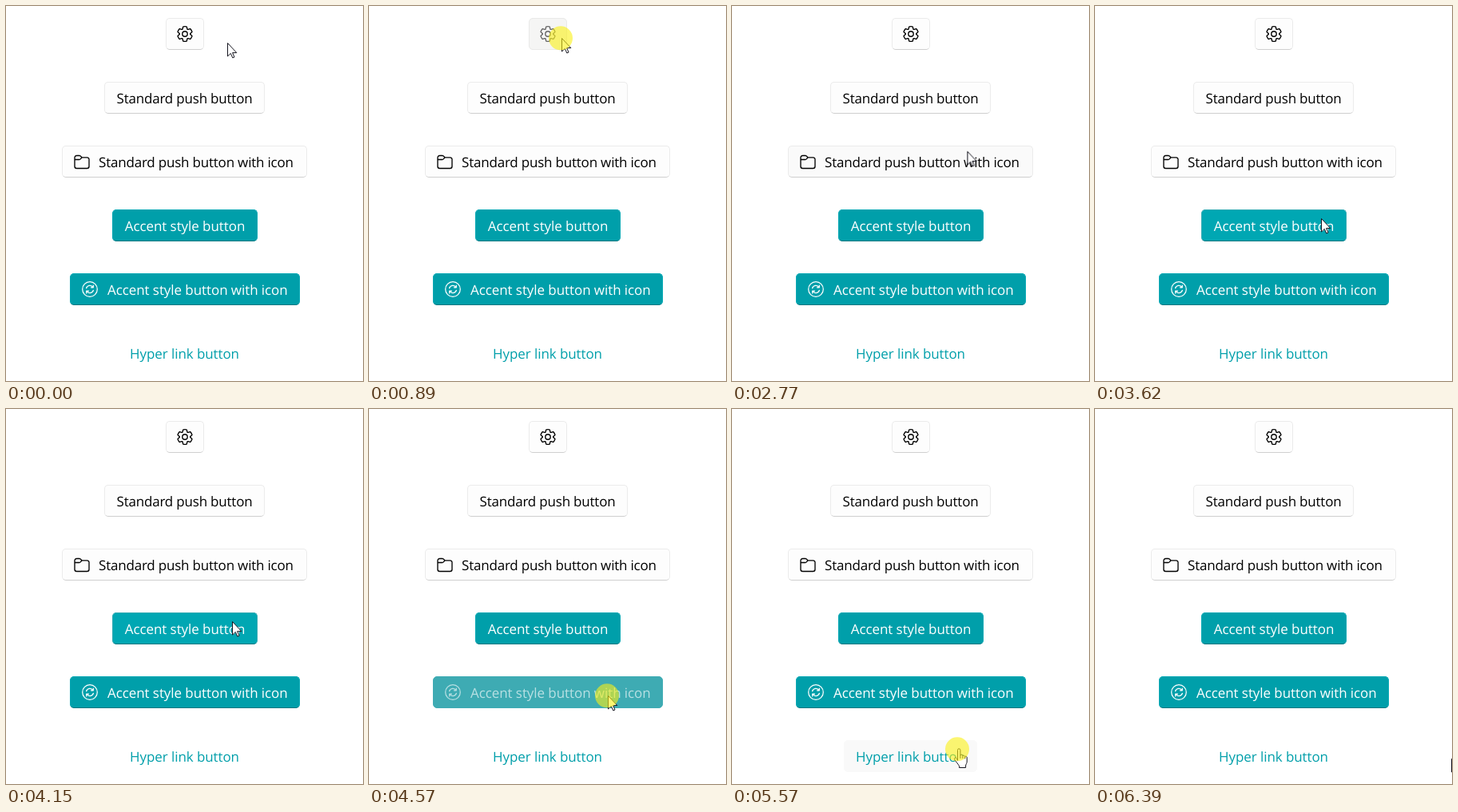
These frames come from a looping animation (447 px wide and 470 px high, 6460 ms). An HTML page:

```html
<!DOCTYPE html>
<html lang="en">
<head>
<meta charset="utf-8">
<title>Button styles</title>
<style>
  html, body { margin: 0; width: 100%; height: 100%; overflow: hidden; background: #fff; }
  #stage { position: relative; width: 447px; height: 470px; overflow: hidden; }

  .btn {
    position: absolute; box-sizing: border-box; height: 40px;
    border: 1px solid; border-radius: 5px;
    font: 17px/39px "Open Sans", "Noto Sans", sans-serif;
    text-align: center; white-space: nowrap;
    text-rendering: geometricPrecision;
    animation: 6460ms step-end infinite;
  }
  .std {
    --bg: #fdfdfd; --fg: #000; --edge: #ebebeb; --base: #cfcfcf;
    --bg-h: #fafafa; --edge-h: #ebebeb; --base-h: #cfcfcf;
    --bg-p: #f5f5f4; --fg-p: #666; --edge-p: #e9e9e8;
    letter-spacing: -.2px;
  }
  .accent {
    --bg: #009faa; --fg: #fff; --edge: #00a7b3; --base: #007780;
    --bg-h: #00a7b3; --edge-h: #2daab3; --base-h: #007780;
    --bg-p: #3eabb3; --fg-p: rgba(255,255,255,.63); --edge-p: #3eabb3;
    letter-spacing: -.07px;
  }
  .link {
    --bg: #fff; --fg: #009faa; --edge: #fff; --base: #fff;
    --bg-h: #f6f6f6; --edge-h: #f6f6f6; --base-h: #f6f6f6;
    --bg-p: #f9f9f9; --fg-p: #009faa; --edge-p: #f9f9f9;
    letter-spacing: -.09px;
  }
  .btn { background-color: var(--bg); color: var(--fg); border-color: var(--edge) var(--edge) var(--base); }
  .icon { text-align: left; }
  .btn svg { position: absolute; fill: none; stroke: currentColor; stroke-linejoin: round; stroke-linecap: round; overflow: visible; }

  #gear   { left: 200px; top: 15px;  width: 48px;  animation-name: gear; }
  #push   { left: 123px; top: 95px;  width: 201px; animation-name: push; }
  #folder { left: 70px;  top: 175px; width: 307px; padding-left: 45px; animation-name: folder; }
  #solid  { left: 133px; top: 255px; width: 182px; animation-name: solid; }
  #sync   { left: 80px;  top: 335px; width: 288px; padding-left: 46px; animation-name: sync; }
  #hyper  { left: 140px; top: 415px; width: 167px; animation-name: hyper; }

  /* hover, press, release, leave */
  @keyframes gear {
    10.1%, 18.73% { background-color: var(--bg-h); color: var(--fg); border-color: var(--edge-h) var(--edge-h) var(--base-h); }
    13.77% { background-color: var(--bg-p); color: var(--fg-p); border-color: var(--edge-p); }
    21.4%, 100% { background-color: var(--bg); color: var(--fg); border-color: var(--edge) var(--edge) var(--base); }
  }
  @keyframes push {
    24.6%, 36.53% { background-color: var(--bg-h); color: var(--fg); border-color: var(--edge-h) var(--edge-h) var(--base-h); }
    29.4% { background-color: var(--bg-p); color: var(--fg-p); border-color: var(--edge-p); }
    39.8%, 100% { background-color: var(--bg); color: var(--fg); border-color: var(--edge) var(--edge) var(--base); }
  }
  @keyframes folder {
    42.3%, 51.08% { background-color: var(--bg-h); color: var(--fg); border-color: var(--edge-h) var(--edge-h) var(--base-h); }
    44.88% { background-color: var(--bg-p); color: var(--fg-p); border-color: var(--edge-p); }
    52.9%, 100% { background-color: var(--bg); color: var(--fg); border-color: var(--edge) var(--edge) var(--base); }
  }
  @keyframes solid {
    54.4%, 64.24% { background-color: var(--bg-h); color: var(--fg); border-color: var(--edge-h) var(--edge-h) var(--base-h); }
    60.05% { background-color: var(--bg-p); color: var(--fg-p); border-color: var(--edge-p); }
    65.9%, 100% { background-color: var(--bg); color: var(--fg); border-color: var(--edge) var(--edge) var(--base); }
  }
  @keyframes sync {
    66.9%, 77.86% { background-color: var(--bg-h); color: var(--fg); border-color: var(--edge-h) var(--edge-h) var(--base-h); }
    70.73% { background-color: var(--bg-p); color: var(--fg-p); border-color: var(--edge-p); }
    80.4%, 100% { background-color: var(--bg); color: var(--fg); border-color: var(--edge) var(--edge) var(--base); }
  }
  @keyframes hyper {
    83%, 88.24% { background-color: var(--bg-h); color: var(--fg); border-color: var(--edge-h) var(--edge-h) var(--base-h); }
    86.21% { background-color: var(--bg-p); color: var(--fg-p); border-color: var(--edge-p); }
    90.8%, 100% { background-color: var(--bg); color: var(--fg); border-color: var(--edge) var(--edge) var(--base); }
  }

  #pointer { position: absolute; left: 0; top: 0; width: 1px; height: 1px; overflow: visible; animation: move 6460ms ease-in-out infinite; }
  #pointer path { fill: #fff; stroke: #15151f; stroke-linejoin: round; }
  #arrow { animation: arrow 6460ms step-end infinite; }
  #hand { opacity: 0; animation: hand 6460ms step-end infinite; }
  #click { fill: rgba(250,240,20,.6); opacity: 0; animation: click 6460ms step-end infinite; }

  @keyframes move {
    0%, 3.87% { transform: translate(277px, 46px); }
    12.69%, 18.6% { transform: translate(241px, 40px); }
    27.4%, 36.5% { transform: translate(280px, 108px); }
    44.7%, 51.1% { transform: translate(296px, 190px); }
    55.7%, 64.2% { transform: translate(283px, 266px); }
    68.5%, 78% { transform: translate(299px, 359px); }
    85.1% { transform: translate(283px, 426px); }
    88.2% { transform: translate(283px, 426px); animation-timing-function: ease-in; }
    93.6% { transform: translate(370px, 440px); }
    94.7% { transform: translate(370px, 440px); animation-timing-function: linear; }
    98.9%, 100% { transform: translate(446px, 438px); }
  }
  @keyframes arrow {
    0%, 90.8%, 100% { opacity: 1; }
    83% { opacity: 0; }
  }
  @keyframes hand {
    0%, 90.8%, 100% { opacity: 0; }
    83% { opacity: 1; }
  }
  @keyframes click {
    0%, 18.73%, 36.53%, 51.08%, 64.24%, 77.86%, 88.24%, 100% { opacity: 0; }
    13.77%, 29.4%, 44.88%, 60.05%, 70.73%, 86.21% { opacity: 1; }
  }
</style>
</head>
<body>
<div id="stage">
  <div class="btn std" id="gear">
    <svg style="left:12px; top:8px" width="22" height="22" viewBox="-10 -10 20 20" stroke-width="1.25">
      <defs>
        <path id="tooth" d="M-3-5.23A1 1 0 0 0-2.53-5.91l.36-2a.5.5 0 0 1 .4-.4A8.5 8.5 0 0 1 1.77-8.31a.5.5 0 0 1 .4.4l.36 2A1 1 0 0 0 3-5.23"/>
      </defs>
      <use href="#tooth"/>
      <use href="#tooth" transform="rotate(60)"/>
      <use href="#tooth" transform="rotate(120)"/>
      <use href="#tooth" transform="rotate(180)"/>
      <use href="#tooth" transform="rotate(240)"/>
      <use href="#tooth" transform="rotate(300)"/>
      <circle r="2.9"/>
    </svg>
  </div>
  <div class="btn std" id="push">Standard push button</div>
  <div class="btn std icon" id="folder">
    <svg style="left:14px; top:10px" width="20" height="20" viewBox="0 0 20 20" stroke-width="1.35">
      <path d="M1 15V4a2.5 2.5 0 0 1 2.5-2.5h3.3a2 2 0 0 1 1.4.6L10 3.8h6.5A2.5 2.5 0 0 1 19 6.3V15a2.5 2.5 0 0 1-2.5 2.5h-13A2.5 2.5 0 0 1 1 15ZM1 6.5h5.8a2 2 0 0 0 1.4-.6L10 3.8"/>
    </svg>Standard push button with icon</div>
  <div class="btn accent" id="solid">Accent style button</div>
  <div class="btn accent icon" id="sync">
    <svg style="left:14px; top:9px" width="20" height="20" viewBox="-10 -10 20 20" stroke-width="1.25">
      <defs><path id="turn" d="M-4.4-1.3A4.6 4.6 0 0 1 4-2.3M4.3-5v2.8H1.5"/></defs>
      <circle r="9.3"/>
      <use href="#turn"/>
      <use href="#turn" transform="rotate(180)"/>
    </svg>Accent style button with icon</div>
  <div class="btn link" id="hyper">Hyper link button</div>

  <svg id="pointer">
    <path id="arrow" d="M.5.5V17l3.8-3.6 2.5 5.6 2.2-1-2.4-5.4h5.2z"/>
    <path id="hand" d="M-.5 14.5v-13a1.7 1.7 0 0 1 3.4 0v7a1.5 1.5 0 0 1 3 .6 1.5 1.5 0 0 1 2.8.7 1.4 1.4 0 0 1 2.5 1V16c0 2-1.6 3.5-1.6 5v2.5H1.5v-2C0 18.5-3 16-4.5 12.8-5 11-2.5 10.5-1.5 12.3zM2.9 8.5V12M5.9 9.1V12M8.7 9.8v2.5"/>
    <circle id="click" cx="-1" cy=".3" r="15"/>
  </svg>
</div>
</body>
</html>
```
